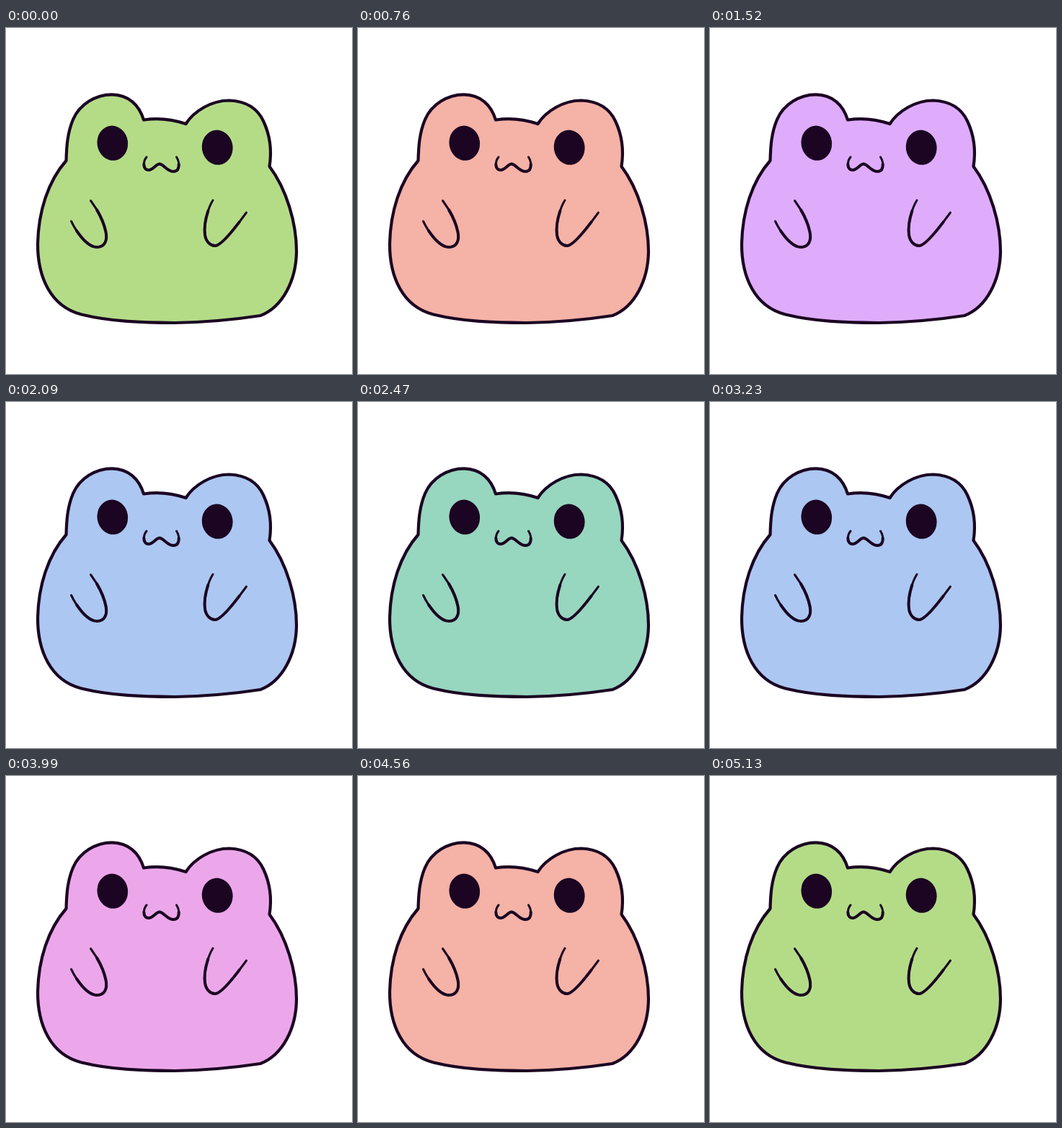
Write an HTML page that moves like this. It is 480x480 px and loops after 5320 ms.

```html
<!DOCTYPE html>
<html lang="en">
<head>
<meta charset="utf-8">
<title>Colour-changing frog</title>
<style>
  html, body { margin: 0; width: 100%; height: 100%; overflow: hidden; background: #fff; }
  svg { display: block; width: 100%; height: 100%; }
  .ink { fill: none; stroke: #1b0522; stroke-linecap: round; stroke-linejoin: round; }
  .thin { stroke-width: 3; }
  /* heavier middle, so the line ends look tapered */
  .core { stroke-width: 4; stroke-dasharray: 76 100; stroke-dashoffset: -12; }
  #body { stroke: #1b0522; stroke-width: 4.2; stroke-linejoin: round; }
  .eye { fill: #1b0522; }
</style>
</head>
<body>
<svg viewBox="0 0 480 480">
  <path id="body" d="M83.500 184
    C84 165 85 146 93 127 C102 106 124 92.300 147 92.300
    C170 92.500 185 107 191 127.500
    C210 124.500 232 127 249.500 133
    C261 115 285 100.500 310 100.500
    C333 101.500 349 112 357 129
    C366 148 369 170 365.500 192
    C389.500 224 403 271 403 310
    C402.500 350 384 387 353 399
    C317 404.500 277 408.300 234 409
    C190 408.800 146 407.500 105 397.500
    C61 386.500 43.700 344 44 299
    C45 255 58 213 83.500 184Z"/>
  <ellipse class="eye" cx="147.800" cy="159.700" rx="21.300" ry="24.200" transform="rotate(-8 147.800 159.700)"/>
  <ellipse class="eye" cx="293.200" cy="165.700" rx="21.400" ry="24.200" transform="rotate(-8 293.200 165.700)"/>
  <g id="lines"></g>
</svg>
<script>
const STEP = 190;

// One sweep around the hue circle at even brightness, played there and back.
const sweep = [
  "#b4dc87", "#b4dc87", "#cbcd78", "#e4be82", "#f5b2a6",
  "#f6adbe", "#f4a8d6", "#eca7ea", "#dfacfc", "#c8b5fc",
  "#b8bef8", "#acc7f1", "#9bd2d9", "#97d6bf", "#a0dca0"
];

const lines = [
  "M195 179C189.500 186 190 197 198 197C204 197 208 189 213 188.500C219 189.500 224 199 232 199C242 199.500 241 186 236.500 179",
  "M90.500 268C98 284 113 303.500 126 304C137 304 141 295 138.500 283C135 266 126 251 117.500 239.500",
  "M287 239C280 250 274 272 276 287C277.500 297 284 302.500 291 302C301 300 318 277 333.500 256"
];

const draw = (d, kind) => `<path class="ink ${kind}" d="${d}" pathLength="100"/>`;
document.getElementById("lines").innerHTML =
  lines.map(d => draw(d, "thin") + draw(d, "core")).join("");

const body = document.getElementById("body");
const last = sweep.length - 1;
const start = performance.now();

function render(time) {
  const step = Math.floor(Math.max(0, time) / STEP) % (2 * last);
  body.setAttribute("fill", sweep[last - Math.abs(last - step)]);
}

function tick(now) {
  render(now - start);
  requestAnimationFrame(tick);
}

render(0);
requestAnimationFrame(tick);
</script>
</body>
</html>
```
